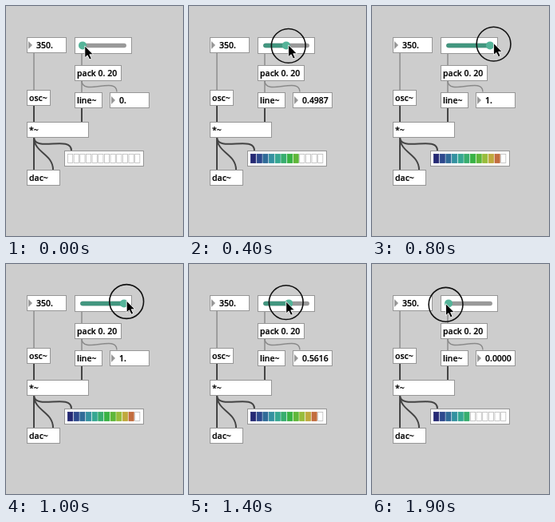
An HTML page for the animation above (2000 ms loop, 222 by 288 pixels).

```html
<!DOCTYPE html>
<html lang="en">
<head>
<meta charset="utf-8">
<title>Oscillator volume patch</title>
<style>
  html, body { margin: 0; width: 100%; height: 100%; overflow: hidden; background: #cdcdcd; }
  svg { display: block; width: 222px; height: 288px; }
  text { font: 600 10.5px "Open Sans", "Noto Sans", sans-serif; fill: #000; stroke: #000; stroke-width: .2; white-space: pre; }
  .box { fill: #fff; stroke: #969696; }
  .wire { fill: none; stroke: #898989; stroke-width: 1.4; }
  .signal { fill: none; stroke: #444; stroke-width: 2; }
  .arrow { fill: #999; }
  .track { fill: none; stroke-width: 5.5; stroke-linecap: round; }
</style>
</head>
<body>
<svg viewBox="0 0 222 288">
  <g id="wires"></g>
  <g id="boxes"></g>
  <path class="track" stroke="#999" d="M96 49.4H148.2"/>
  <path class="track" stroke="#42967f" id="fill"/>
  <circle id="knob" cy="49.4" r="5" fill="#55b499"/>
  <text id="number" x="142" y="122"></text>
  <g id="meter"></g>
  <g id="pointer">
    <circle id="ring" r="21.4" fill="none" stroke="#111" stroke-width="1.6"/>
    <path transform="scale(1.06)" d="M0 -1V13L3.2 10.2L5.6 15.2L8 14L5.7 9.2H10Z" fill="#000" stroke="#fff" stroke-width=".8"/>
  </g>
</svg>
<script>
const STEP = 100, STEPS = 20, CELLS = 12, FULL = 11;
const $ = id => document.getElementById(id);

function add(parent, tag, attrs, text = "") {
  const node = document.createElementNS("http://www.w3.org/2000/svg", tag);
  for (const key in attrs) node.setAttribute(key, attrs[key]);
  node.textContent = text;
  return parent.appendChild(node);
}

function box(x, y, width, label = "", height = 19) {
  add($("boxes"), "rect", { class: "box", x: x + .5, y: y + .5, width, height });
  add($("boxes"), "text", { x: x + 3, y: y + 14 }, label);
}

function numberBox(x, y, label) {
  box(x, y, 49);
  add($("boxes"), "path", { class: "arrow", d: `M${x + 2} ${y + 5}l5 5l-5 5Z` });
  add($("boxes"), "text", { x: x + 12, y: y + 14 }, label);
}

// Cables leave and enter vertically
function cable(kind, x1, y1, x2, y2) {
  const bend = Math.min(20, Math.max(x2 - x1, y2 - y1) / 2);
  add($("wires"), "path", { class: kind, d: `M${x1} ${y1}C${x1} ${y1 + bend} ${x2} ${y2 - bend} ${x2} ${y2}` });
}

cable("wire", 35, 59, 35, 105);
cable("wire", 95, 59, 95, 74);
cable("wire", 95, 94, 95, 108);
cable("wire", 95, 93.5, 139, 107.5);
cable("signal", 35, 125, 35, 145);
cable("signal", 95, 127, 95, 145);
cable("signal", 35, 164, 35, 205);
cable("signal", 35, 164, 59, 205);
cable("signal", 35, 164, 82, 181);

numberBox(26, 39, "350.");
box(86, 39, 71, "", 20);
box(86, 74, 58, "pack 0. 20");
box(26, 105, 29, "osc~");
box(86, 108, 34, "line~");
numberBox(130, 108, "");
box(26, 145, 77, "*~");
box(73, 181, 99);
box(26, 205, 41, "dac~");

const cells = Array.from({ length: CELLS }, (_, i) => ({
  color: `hsl(${237 - 13.9 * i - .77 * i * i} 52% ${30 + 6.5 * Math.sqrt(i)}%)`,
  node: add($("meter"), "rect", { x: 77.5 + i * 7.65, y: 185.5, width: 6.2, height: 11, "stroke-width": .8 })
}));

// Pointer travel in slider lengths, as [step, travel]; it overshoots at TURN and loses SLIP
const TURN = 9, SLIP = .12;
const drag = [[1, 0], [4, .4987], [6, .7819], [TURN, 1.16], [12, .7035], [16, .1798], [19, -SLIP]];

function travel(step) {
  const next = drag.findIndex(([time]) => time >= step);
  if (next < 1) return drag[0][1];
  const [a, from] = drag[next - 1], [b, to] = drag[next];
  return from + (to - from) * (step - a) / (b - a);
}

function volume(step) {
  const value = travel(step) + (step > TURN ? SLIP : 0);
  return Math.min(1, Math.max(0, value));
}

const level = step => Math.round(FULL * Math.sqrt(volume(step)));

function draw(step) {
  const value = volume(step), x = 96 + 52 * value;
  $("fill").setAttribute("d", `M96 49.4H${x}`);
  $("fill").style.display = value ? "" : "none";
  $("knob").setAttribute("cx", x);
  $("number").textContent = value % 1 ? value.toFixed(4) : value + ".";

  // The meter rises at once and falls three steps late
  const lit = Math.max(level(step), level(step - 3));
  cells.forEach(({ node, color }, i) => {
    node.setAttribute("fill", i < lit ? color : "#fff");
    node.setAttribute("stroke", i < lit ? color : "#bbb");
  });

  const px = 98.8 + 52 * travel(step);
  const py = 49 - 2 * Math.cos(2 * Math.PI * (step - 10.5) / STEPS);
  $("pointer").setAttribute("transform", `translate(${px} ${py})`);
  $("ring").style.display = step ? "" : "none";
}

const start = performance.now();
let shown = -1;
function tick() {
  const step = Math.floor((performance.now() - start) / STEP) % STEPS;
  if (step !== shown) draw(shown = step);
  requestAnimationFrame(tick);
}
tick();
</script>
</body>
</html>
```
